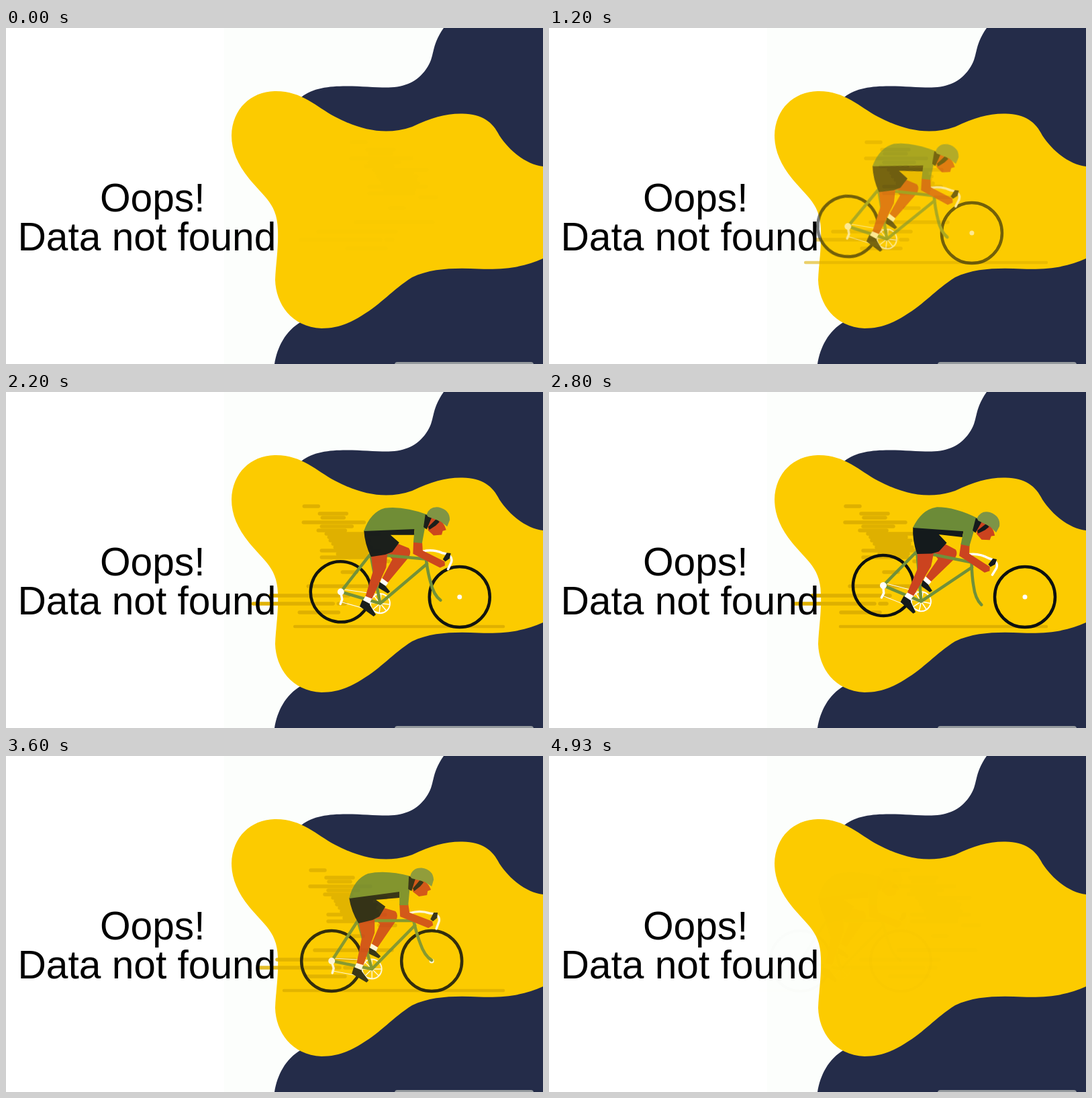
These frames come from a looping animation (800 by 500 pixels, 4.99 s). An HTML page:

```html
<!DOCTYPE html>
<html lang="en">
<head>
<meta charset="utf-8">
<title>Data not found</title>
<style>
  html, body { margin: 0; width: 100%; height: 100%; overflow: hidden; background: #fff; }
  svg { display: block; width: 800px; height: 500px; }
  text { font-family: "Liberation Sans", Arial, sans-serif; font-size: 58.67px; }
  .line { fill: none; stroke-linecap: round; stroke-linejoin: round; }
  .skin { fill: #cb431f; }
  .dark { fill: #141a1c; }
  .green { fill: #6c8b38; }
</style>
</head>
<body>
<svg viewBox="0 0 800 500">
  <rect x="325" width="475" height="500" fill="#fcfefc"/>
  <g fill="#242c49">
    <path d="M652 0C632 28 640 42 626 61C613 80 594 88 570 88.5C530 89 470 78 440 103L470 250L700 300H800V0Z"/>
    <path d="M400 500C404 475 416 451 440 437L600 300H800V500Z"/>
  </g>
  <path fill="#fccb00" d="M400 94C440 93 462 117 490 132C530 153 567 160 605 147C635 133 655 127 680 127.5C710 128 725 140 735 160C750 183 775 203 800 206V343C775 354 750 360 705 358.500C670 357 635 357 605 371C575 390 560 410 530 428C508 442 490 447 470 447C425 445 402 410 401 375C402 350 406 330 405 300C404 262 385 252 362 224C345 203 336 182 336 160C337 120 365 95 400 94Z"/>
  <rect x="579" y="497" width="207" height="10" rx="4" fill="#959a9e"/>

  <path id="wind" class="line" stroke="#deb000" stroke-width="5.5"/>
  <path id="ground" class="line" stroke="#deb000" stroke-width="4.5"/>

  <g id="scene">
    <g id="front">
      <circle r="45" fill="none" stroke="#0c1010" stroke-width="4.500"/>
      <circle r="3.5" fill="#fff"/>
    </g>
    <g id="bike">
      <circle r="45" fill="none" stroke="#0c1010" stroke-width="4.500"/>
      <g transform="translate(-485 -305)">
        <g class="line" stroke="#fff" stroke-width="1">
          <path d="M486 301L543 304M487 320L546 331"/>
          <circle cx="545" cy="317" r="14.500" stroke-width="2"/>
          <path d="M531 317H559M545 303V331M535 307L555 327M555 307L535 327" stroke-width="1.500"/>
          <path d="M485 306L488 316L486 323" stroke-width="3.500"/>
        </g>
        <path class="skin" d="M556 224L580 231Q585 236 581 245L552 287L543 283L557 250L546 241Z"/>
        <path fill="#fff" d="M544 279L554 285L551 291L542 286Z"/>
        <path class="dark" d="M541 285L550 290L558 298L555 301L540 294Z"/>
        <g class="line" stroke="#6f903b" stroke-width="4.500">
          <path d="M485 305L545 317L524 245L485 305M524 245H606M545 317L609 252"/>
          <path d="M606 240Q611 264 617 279Q623 297 634 304"/>
        </g>
        <circle cx="485" cy="305" r="5" fill="#fff"/>
        <path class="skin" d="M525 247L549 242L549 263L532 312L522 309L530 270Z"/>
        <path class="dark" d="M511 211L586 197L586 211L551 214L565 224L556 239L546 244L525 249Q514 231 511 211Z"/>
        <path fill="#fff" d="M522 308L532 311L529 319L519 315Z"/>
        <path class="dark" d="M518 314L528 318L540 334L537 337L515 324Z"/>
        <path class="line" stroke="#fff" stroke-width="3.500" d="M601 234Q616 229 631 234Q647 235 645 246L641 257"/>
        <path class="skin" d="M586 220L599 220L601 233L635 246L636 252L629 256L587 239Z"/>
        <path class="dark" d="M632 243L637 233L643 233L642 241L636 246Z"/>
        <path class="green" d="M511 212Q518 183 539 175Q566 169 603 179L599 222H586V202Z"/>
        <path class="skin" d="M602 181L622 183L630 193L633 199L628 201L627 207L615 209L606 202Z"/>
        <path class="dark" d="M600 179L610 182L604 201L599 198Z"/>
        <path class="dark" d="M617 184L622 188L617 194L608 201L606 197Z"/>
        <path fill="#7d9447" d="M602 179Q605 166 619 166.500Q636 169 637 184L634 194L623 187L604 182Z"/>
      </g>
    </g>
  </g>
  <text x="140" y="273">Oops!</text>
  <text x="17.500" y="331">Data not found</text>
</svg>
<script>
const LOOP = 4990, FRAMES = 75, RIDE = 1655, LEAVE = 1150;
const $ = id => document.getElementById(id);
const set = (id, attrs) => {
  for (const name in attrs) $(id).setAttribute(name, attrs[name]);
};
const clamp = v => Math.max(0, Math.min(1, v));

// Speed streaks: left, right, height
const streaks = [
  [515, 536, 170], [538, 578, 181], [542, 574, 187], [514, 604, 194],
  [541, 586, 200], [536, 576, 206], [548, 627, 211], [552, 605, 216],
  [554, 612, 221], [558, 610, 226], [561, 614, 231], [541, 626, 236],
  [565, 608, 241], [541, 607, 246], [617, 641, 252], [572, 593, 268],
  [521, 636, 289], [465, 581, 303], [439, 558, 315], [566, 576, 315],
  [508, 566, 328]
];
$("wind").setAttribute("d", streaks.map(([a, b, y]) => `M${a} ${y}H${b}`).join(""));

function rideAt(phase) {
  if (phase >= LEAVE) {
    const rest = Math.exp((LEAVE - phase) / 86);
    return { shown: rest, tilt: rest };
  }
  const start = clamp(phase / 8);
  const shown = start * (1 - 0.43 * (1 - clamp(phase / 740)) ** 2);
  const tilt = 1 - (1 - clamp((phase - 450) / 500)) ** 3;
  return { shown, tilt };
}

function draw(time) {
  const step = LOOP / FRAMES;
  const now = Math.floor((time % LOOP) / step) * step;
  const { shown, tilt } = rideAt(now % RIDE);
  const x = 374 + 133 * shown;
  set("scene", { opacity: shown });
  set("bike", { transform: `translate(${x - 9 * tilt} ${305 - 17 * tilt}) rotate(${11.5 * tilt})` });
  set("front", { transform: `translate(${x + 149 + 53 * tilt} 305)` });
  set("wind", { transform: `translate(${-73 * shown} 0)`, opacity: Math.max(0.06, shown) });
  set("ground", { d: `M${312 + 122 * shown} 349H741`, opacity: shown });
}

const begin = performance.now();
function tick() {
  draw(performance.now() - begin);
  requestAnimationFrame(tick);
}
tick();
</script>
</body>
</html>
```
